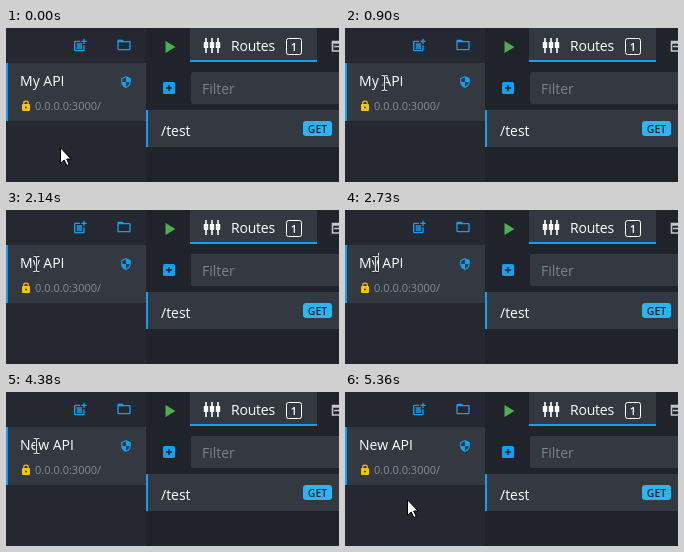
These frames come from a looping animation (333 px wide and 154 px high, 5910 ms). An HTML page:

```html
<!DOCTYPE html>
<html lang="en">
<head>
<meta charset="utf-8">
<title>Rename an API</title>
<style>
html, body { margin: 0; width: 100%; height: 100%; overflow: hidden; background: #20232a; }
svg { display: block; width: 333px; height: 154px; }
text { font: 14px "Open Sans", "Noto Sans", sans-serif; fill: #fff; white-space: pre; }
.row { fill: #343841; }
.blue { fill: #10a0f4; }
.pointer { fill: #fff; stroke: #000; stroke-linejoin: round; }
</style>
</head>
<body>
<svg viewBox="0 0 333 154">
  <!-- sidebar -->
  <rect width="140" height="154" fill="#252830"/>
  <rect class="row" y="35" width="140" height="58"/>
  <rect class="blue" y="35" width="2" height="58"/>
  <g class="blue">
    <path transform="translate(66 9.3) scale(.667)" d="M17 19.2H5V7h7V5H5q-2 0-2 2v12q0 2 2 2h12q2 0 2-2v-7h-2zM19 2h-2v3h-3v2h3v3h2V7h3V5h-3zM7 9h8v2H7zM7 12h8v2H7zM7 15h8v2H7z"/>
    <path transform="translate(110 9) scale(.667)" fill-rule="evenodd" d="M20 6h-8l-2-2H4q-2 0-2 2v12q0 2 2 2h16q2 0 2-2V8q0-2-2-2zM20 18H4V8h16z"/>
    <path transform="translate(113.5 47.5) scale(.54)" fill-rule="evenodd" d="M12 1L3 5v6c0 5.5 3.8 10.7 9 12 5.2-1.3 9-6.5 9-12V5zM12 12h7c-.5 4.1-3.3 7.8-7 8.9V12H5V6.3l7-3.1z"/>
  </g>
  <path d="M17.8 76.5V75Q17.8 73.2 20 73.2T22.2 75V76.5" fill="none" stroke="#ffc107" stroke-width="1.2"/>
  <rect x="16" y="76" width="8" height="7" rx="1" fill="#ffc107"/>
  <circle cx="20" cy="79.5" r="1" fill="#343841"/>
  <text x="29" y="82" style="font-size:11px;fill:#888c94">0.0.0.0:3000/</text>

  <!-- toolbar and tabs -->
  <path d="M159.5 13L169.5 19L159.5 25Z" fill="#4caf50"/>
  <rect class="row" x="184" width="127" height="34"/>
  <rect class="blue" x="184" y="32" width="127" height="2"/>
  <path d="M200 10V25M206 10V25M212 10V25" stroke="#fff" stroke-width="1.6"/>
  <path d="M200 14V20M206 14V20M212 14V20" stroke="#fff" stroke-width="4.4"/>
  <text x="225" y="23" style="letter-spacing:-.2px">Routes</text>
  <rect x="280.5" y="10.5" width="15" height="16" rx="2" fill="none" stroke="#fff"/>
  <text x="288" y="23" text-anchor="middle" style="font-size:11px;font-weight:600">1</text>
  <path d="M335 13.5H326.5V23H335M326 15H335M328 18.5H335" fill="none" stroke="#c4c6c9" stroke-width="1.6"/>

  <!-- route list -->
  <rect class="blue" x="157" y="54" width="12" height="12" rx="1.5"/>
  <path d="M163 57V63M160 60H166" stroke="#20232a" stroke-width="1.6"/>
  <rect class="row" x="185" y="44" width="150" height="32" rx="2"/>
  <text x="196" y="66" style="fill:#7d8189">Filter</text>
  <rect class="row" x="140" y="82" width="193" height="37"/>
  <rect class="blue" x="140" y="82" width="2" height="37"/>
  <text x="155" y="108" style="font-weight:500">/test</text>
  <rect x="297" y="93" width="29" height="15" rx="3" fill="#29b6f6"/>
  <text x="311.5" y="105" text-anchor="middle" style="font-size:10.5px;font-weight:600;fill:#20232a">GET</text>

  <text id="name" x="14" y="58"></text>
  <rect id="caret" y="43" width="1" height="19" fill="#fff"/>
  <g id="arrow" class="pointer">
    <path d="M.5 .7V16.5L4.2 13L6.8 18.5L9.2 17.4L6.7 12H11Z"/>
  </g>
  <g id="hand" class="pointer">
    <path d="M-1.7 2Q-1.7 .5 0 .5T1.7 2V7Q3.5 6.2 4.3 7.8Q6.3 7 7.2 8.6Q9 8.3 9 10.5V15Q9 17.5 7.5 19V21.5H-2V19.5Q-3.5 18-5.5 13.5Q-6.3 11.5-5 11Q-3.5 10.5-1.7 13Z"/>
  </g>
  <g id="beam" fill="none">
    <path d="M-3-7.5H-1L0-6.5L1-7.5H3M0-6.5V6.5M-3 7.5H-1L0 6.5L1 7.5H3" stroke="#20232a" stroke-width="2.4"/>
    <path d="M-3-7.5H-1L0-6.5L1-7.5H3M0-6.5V6.5M-3 7.5H-1L0 6.5L1 7.5H3" stroke="#dedfe1" stroke-width="1.1"/>
  </g>
</svg>
<script>
const LOOP = 5910;

// time, pointer, x, y
const moves = [
  [0, 'arrow', 54, 119],
  [400, 'arrow', 49, 109],
  [480, 'hand', 40, 88],
  [550, 'hand', 34, 74],
  [640, 'hand', 33, 64],
  [720, 'beam', 40.5, 56],
  [900, 'beam', 39.5, 55],
  [960, 'beam', 38.5, 54],
  [1200, 'beam', 38.5, 53],
  [1360, 'beam', 36.5, 53],
  [1440, 'beam', 35.5, 53],
  [1860, 'beam', 34.5, 53],
  [2140, 'beam', 30.5, 54],
  [5060, 'hand', 36, 66],
  [5140, 'hand', 45, 80],
  [5210, 'arrow', 54, 96],
  [5290, 'arrow', 60, 104],
  [5360, 'arrow', 62, 107]
];

// time, name, caret x (none when hidden)
const edits = [
  [0, 'My API'],
  [1110, 'My API', 59],
  [1590, 'My API', 33],
  [2140, 'My API'],
  [2670, 'My API', 33],
  [2750, 'M API', 26],
  [2830, ' API', 14],
  [3210, ' API'],
  [3390, 'N API', 24],
  [3900, 'Ne API', 32],
  [4140, 'New API', 42],
  [4380, 'New API']
];

const $ = id => document.getElementById(id);
const nameText = $('name'), caret = $('caret');
const pointers = ['arrow', 'hand', 'beam'].map($);
const show = (el, on) => el.setAttribute('visibility', on ? 'visible' : 'hidden');
const at = (steps, t) => steps.findLast(step => step[0] <= t);

function draw(t) {
  const [, kind, x, y] = at(moves, t);
  for (const p of pointers) {
    show(p, p.id === kind);
    p.setAttribute('transform', `translate(${x} ${y})`);
  }
  const [, label, caretX] = at(edits, t);
  if (nameText.textContent !== label) nameText.textContent = label;
  show(caret, caretX !== undefined);
  caret.setAttribute('x', caretX ?? 0);
}

const start = performance.now();
function tick() {
  draw((performance.now() - start) % LOOP);
  requestAnimationFrame(tick);
}
tick();
</script>
</body>
</html>
```
